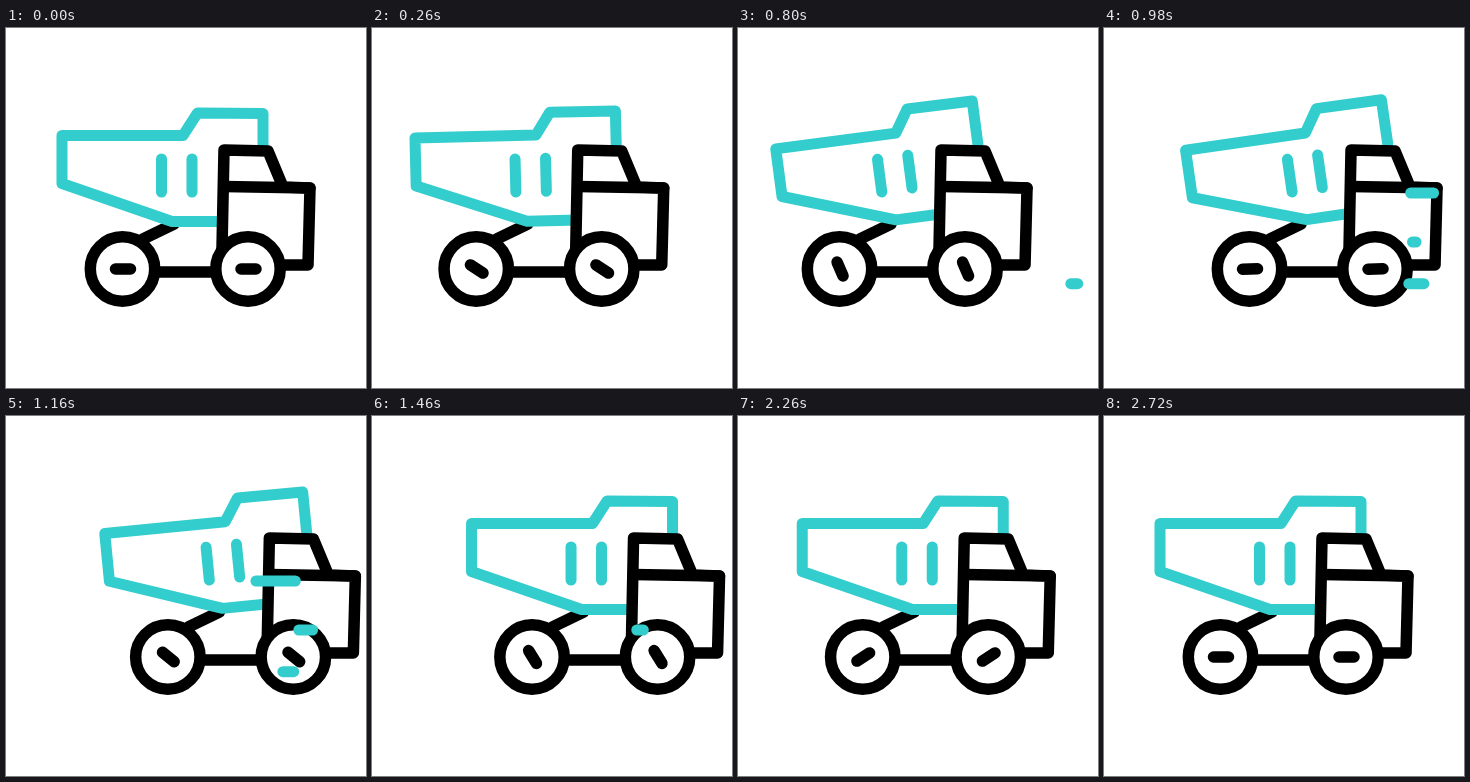
An HTML page that plays this animation: 360x360 px, repeating every 2960 ms.

```html
<!DOCTYPE html>
<html lang="en">
<head>
<meta charset="utf-8">
<title>Dump truck</title>
<style>
  html, body { margin: 0; width: 100%; height: 100%; overflow: hidden; background: #fff; }
  svg { display: block; width: 100%; height: 100%; }
  svg * { stroke-width: 11; stroke-linecap: round; stroke-linejoin: round; }
  .teal { stroke: #33cdcd; fill: none; }
  .black, .black * { stroke: #000; stroke-width: 11.5; fill: none; }
  .black.solid, .black .solid { fill: #fff; }
</style>
</head>
<body>
<svg viewBox="0 0 360 360">
  <g id="truck">
    <path class="black" d="M137 211L168 196M140 244H220"/>
    <g id="bed" class="teal">
      <path d="M257 130V85.500L191.500 85L177 107.500H56V155.500L166 193.500H228"/>
      <path d="M155.500 131V164M186 131V164"/>
    </g>
    <path class="black solid" d="M277 237H302L304 160L277 159L262 123L218 122L216 220"/>
    <path class="black" d="M218 158.500L304 160"/>
    <g class="black">
      <circle class="solid" cx="116.500" cy="241" r="32.200"/>
      <circle class="solid" cx="242" cy="241" r="32.200"/>
      <path class="hub" d="M109.500 241H124.500" data-x="117"/>
      <path class="hub" d="M235 241H250" data-x="242.500"/>
    </g>
  </g>
  <g id="streaks" class="teal"></g>
</svg>
<script>
const LOOP = 2960;
const truck = document.getElementById('truck');
const bed = document.getElementById('bed');
const hubs = document.querySelectorAll('.hub');

// Horizontal streaks: each end travels from x0 to x1 within its own time span.
const streaks = [
  { y: 255.7, x0: 340, x1: 270, head: [684, 1276], tail: [780, 1347] },
  { y: 165, x0: 330, x1: 230, head: [840, 1290], tail: [964, 1414] },
  { y: 214, x0: 312, x1: 262, head: [870, 1560], tail: [1043, 1620] }
].map(s => {
  s.line = document.createElementNS('http://www.w3.org/2000/svg', 'path');
  document.getElementById('streaks').append(s.line);
  return s;
});

// Cubic ease with flat ends; a and b are the x positions of its handles.
function ease(x, a = 1 / 3, b = 2 / 3) {
  if (x <= 0) return 0;
  if (x >= 1) return 1;
  let lo = 0, hi = 1, s;
  for (let i = 0; i < 24; i++) {
    s = (lo + hi) / 2;
    const r = 1 - s;
    if (3 * r * r * s * a + 3 * r * s * s * b + s * s * s < x) lo = s;
    else hi = s;
  }
  return s * s * (3 - 2 * s);
}

const span = (t, start, end, a, b) => ease((t - start) / (end - start), a, b);

function draw(t) {
  const back = span(t, 0, 595);
  const home = span(t, 1265, 2720, 0.26, 0.58);
  const shift = -30 * back + 77 * span(t, 600, 1265, 0.51, 0.33) - 47 * home;
  const spin = -360 * back + 1200 * span(t, 610, 1265) - 840 * home;
  const tilt = -8.2 * (span(t, 0, 980) - span(t, 980, 1460));

  truck.setAttribute('transform', `translate(${shift} 0)`);
  bed.setAttribute('transform', `rotate(${tilt} 157 139)`);
  for (const hub of hubs) {
    hub.setAttribute('transform', `rotate(${spin} ${hub.dataset.x} 241)`);
  }
  for (const { line, y, x0, x1, head, tail } of streaks) {
    const at = range => x0 + (x1 - x0) * span(t, ...range);
    const visible = t > head[0] + 40 && t < tail[1] - 40;
    line.setAttribute('d', visible ? `M${at(tail)} ${y}H${at(head)}` : '');
  }
}

function frame() {
  draw(performance.now() % LOOP);
  requestAnimationFrame(frame);
}
frame();
</script>
</body>
</html>
```
